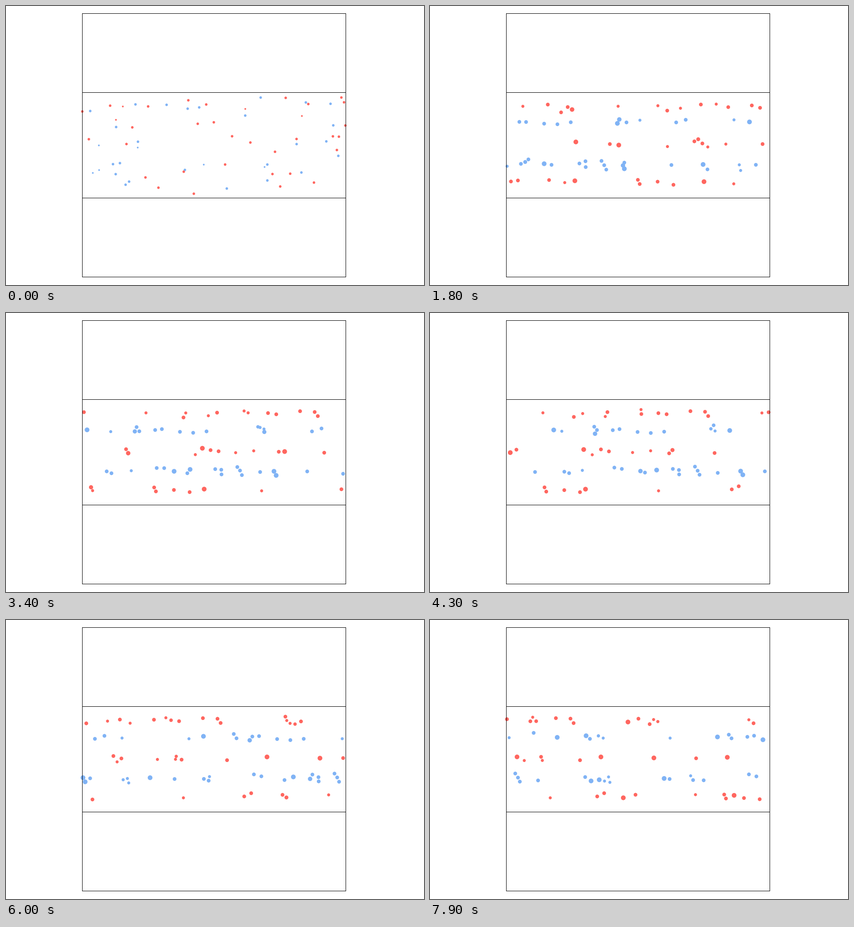
Write a matplotlib script that moves like this. It is 917 px wide and 611 px high and loops after 8 s.

```python
import numpy as np
import matplotlib.pyplot as plt
from matplotlib.animation import FuncAnimation

W, H, DPI = 917, 611, 100
FRAMES, INTERVAL = 80, 100
LEFT, RIGHT = 167.1, 744.5
EDGES = (16.5, 189.5, 420.5, 593.5)
MARGIN = 56                            # unseen stretch beyond each end
SPAN = RIGHT - LEFT + 2 * MARGIN
BLUE, RED = "#80b3f5", "#ff665f"
LANES = {BLUE: (257, 347), RED: (220, 303, 386)}
CROWD = 40                             # walkers per colour
CRUISE, SLOW = (10.4, 8.2, 6.6), 3.8   # pixels per frame

rng = np.random.default_rng(12)
colour = np.repeat([BLUE, RED], CROWD)
heading = np.repeat([1, -1], CROWD)    # blue walks right, red walks left


def nearest_lane(y, c):
    return min(LANES[c], key=lambda lane: abs(lane - y))


def start():
    """Scatter the crowd; each walker aims for the closest lane."""
    n = 2 * CROWD
    x = rng.uniform(LEFT - MARGIN, RIGHT + MARGIN, n)
    y = rng.uniform(199, 412, n)
    lane = np.array([nearest_lane(*p) for p in zip(y, colour)])
    lane = lane + rng.normal(0, 4, n)
    cruise = rng.choice(CRUISE, n, p=(0.28, 0.6, 0.12))
    speed = rng.choice((5.6, SLOW), n, p=(0.82, 0.18))
    return x, y, lane, cruise, speed


def step(x, y, lane, cruise, speed):
    """Advance one frame: cruise, follow, give way and drift to the lane."""
    gap = (x - x[:, None]) * heading[:, None] % SPAN
    side = y[:, None] - y
    same = heading[:, None] == heading
    np.fill_diagonal(gap, SPAN)

    leader = same & (gap < 13) & (abs(side) < 6)
    facing = ~same & (gap < 32) & (abs(side) < 9)
    limit = np.where(leader, speed, np.inf).min(axis=1)
    goal = np.minimum(cruise, limit)
    goal = np.where(facing.any(axis=1), SLOW, goal)
    speed = speed + 0.3 * (goal - speed)

    near = same & (np.minimum(gap, SPAN - gap) < 9) & (abs(side) < 9)
    np.fill_diagonal(near, False)
    push = np.sign(side) * (1.2 * facing + 0.8 * near)
    y = y + 0.1 * (lane - y) + np.clip(push.sum(axis=1), -2.5, 2.5)
    x = (x + heading * speed - LEFT + MARGIN) % SPAN + LEFT - MARGIN
    return x, np.clip(y, 199, 412), lane, cruise, speed


states = [start()]
while len(states) < FRAMES:
    states.append(step(*states[-1]))

fig = plt.figure(figsize=((W + 0.01) / DPI, (H + 0.01) / DPI), dpi=DPI,
                 facecolor="white")
ax = fig.add_axes([0, 0, 1, 1])
ax.set(xlim=(0, W), ylim=(H, 0))
ax.axis("off")

line = dict(color="black", lw=0.72, zorder=3)
for y in EDGES:
    ax.plot([LEFT, RIGHT], [y, y], **line)
for x in (LEFT, RIGHT):
    ax.plot([x, x], [EDGES[0], EDGES[-1]], **line)

dots = {c: ax.scatter([], [], color=c, linewidths=0, zorder=2) for c in LANES}


def draw(n):
    x, y, _, _, speed = states[n]
    seen = (x >= LEFT) & (x <= RIGHT)
    for c, art in dots.items():
        pick = seen & (colour == c)
        art.set_offsets(np.c_[x, y][pick])
        # a dot's diameter in pixels equals its speed
        art.set_sizes((speed[pick] * 72 / DPI) ** 2)
    return list(dots.values())


anim = FuncAnimation(fig, draw, frames=FRAMES, interval=INTERVAL,
                     repeat=True, repeat_delay=0)
plt.show()
```
